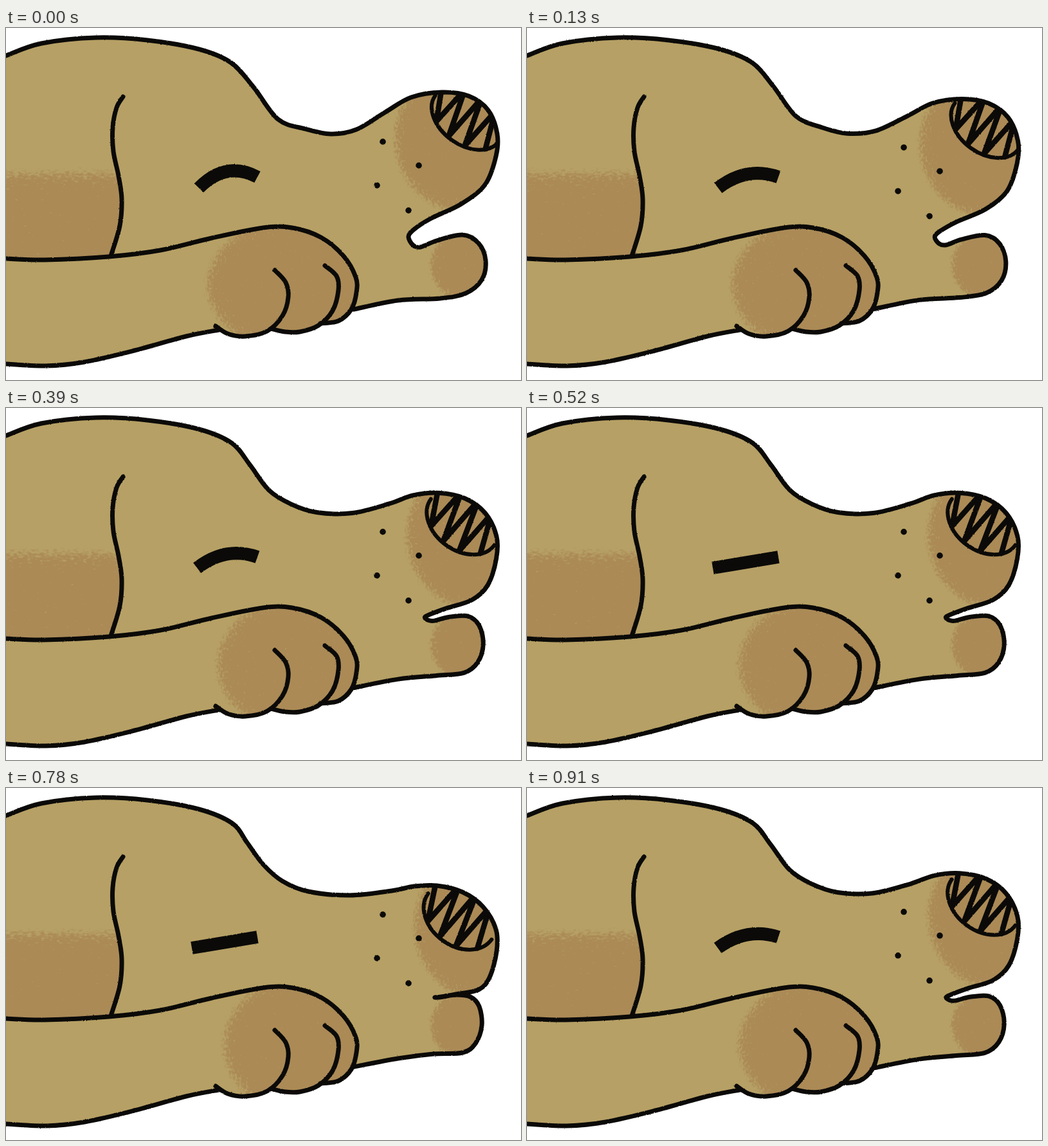
Animation, 801 px wide and 548 px high, one loop 1.04 s. Source, as an HTML page:

```html
<!DOCTYPE html>
<html lang="en">
<head>
<meta charset="utf-8">
<title>Sleeping dog</title>
<style>
html, body { margin: 0; width: 100%; height: 100%; overflow: hidden; background: #fff; }
svg { display: block; width: 801px; height: 548px; }
.coat { fill: #b6a065; }
.ink { fill: none; stroke: #0b0a08; stroke-width: 7; stroke-linecap: round; stroke-linejoin: round; }
#rim { stroke-width: 6; }
#scribble { stroke-width: 8.5; }
#eye { stroke-width: 20; stroke-linecap: butt; }
#dots { stroke-width: 9.5; }
</style>
</head>
<body>
<svg viewBox="0 0 801 548">
  <defs id="defs">
    <filter id="rough" filterUnits="userSpaceOnUse" x="-20" y="-20" width="841" height="588" color-interpolation-filters="sRGB">
      <feTurbulence id="roughGrain" type="fractalNoise" baseFrequency=".4" numOctaves="2"/>
      <feDisplacementMap in="SourceGraphic" scale="2" xChannelSelector="R" yChannelSelector="G"/>
    </filter>
    <clipPath id="headClip"><path id="headArea"/></clipPath>
    <clipPath id="earClip"><path id="earArea"/></clipPath>
    <clipPath id="armClip"><path id="armArea"/></clipPath>
  </defs>
  <path id="headFill" class="coat"/>
  <g clip-path="url(#earClip)"><rect id="earShade" x="-150" y="229" width="500" height="400"/></g>
  <g clip-path="url(#headClip)">
    <ellipse id="muzzleShade" ry="113"/>
    <ellipse id="chinShade" cx="719" cy="369" rx="58" ry="55"/>
  </g>
  <path id="armFill" class="coat"/>
  <g clip-path="url(#armClip)"><ellipse id="pawShade" cx="468" cy="400" ry="108"/></g>
  <g class="ink" filter="url(#rough)">
    <g clip-path="url(#headClip)">
      <path id="scribble"/>
      <path id="rim"/>
    </g>
    <path id="head"/>
    <path id="ear"/>
    <path id="eye"/>
    <path id="arm"/>
    <path id="toe1"/>
    <path id="toe2"/>
    <path id="under"/>
    <path id="dots"/>
  </g>
</svg>
<script>
const STEP = 130;
// One breath: how far the muzzle has sunk, and how curved the eyelid is
const drop = [0, .2, .62, .62, .62, .8, 1, .63];
const bend = [1, .75, .75, .75, 0, 0, 0, .7];

const $ = id => document.getElementById(id);
const parse = s => s.split(' ').map(p => p.split(',').map(Number));
const mix = (a, b, t) => a + (b - a) * t;

const back = parse('-10,47 0,43 55,24 140,15 220,19 300,33');
const raised = parse('350,54 385,92 423,142 465,157 505,165 545,158 590,131 630,108 678,100 720,106 750,128 764,165 762,200 745,244 708,274 660,297 634,314 626,325 633,338 645,341 670,331 710,322 735,335 746,362 740,392 715,413 675,421 610,424 541,438');
const sunk = parse('352,55 375,85 400,119 430,145 470,161 535,167 600,160 635,153 670,152 710,162 742,185 762,220 763,255 752,295 735,314 700,321 677,325 667,326 672,326 680,325 700,322 722,325 736,340 740,370 730,398 710,412 665,414 610,421 541,434');
const still = {
  arm: parse('-10,359 0,359 60,361 160,356 240,346 320,327 400,311 445,311 490,326 525,355 544,388 545,412 537,438 517,456 489,460'),
  toe1: parse('418,377 435,396 439,419 430,448 406,472 372,480 345,476 326,464'),
  toe2: parse('496,370 514,386 517,408 508,440 486,463 457,473 434,473 412,468'),
  under: parse('331,470 280,480 200,502 122,520 62,526 0,523 -10,522'),
  ear: parse('182,107 172,124 166,155 167,192 175,230 180,266 177,308 163,355')
};
const whiskers = parse('586,177 642,214 577,245 626,284');

// Chalk: blurred coverage times grain, cut to a speckled edge
function addChalk(name, freq, blur) {
  $('defs').insertAdjacentHTML('beforeend', `
    <filter id="${name}Chalk" filterUnits="userSpaceOnUse" x="-80" y="-40" width="940" height="640" color-interpolation-filters="sRGB">
      <feGaussianBlur in="SourceAlpha" stdDeviation="${blur}" result="soft"/>
      <feTurbulence id="${name}Grain" type="fractalNoise" baseFrequency="${freq}" numOctaves="3"/>
      <feColorMatrix values="0 0 0 0 0 0 0 0 0 0 0 0 0 0 0 1 0 0 0 0" result="grain"/>
      <feComposite in="soft" in2="grain" operator="arithmetic" k1="6" k2="1" k3="0" k4="-1.4" result="mask"/>
      <feFlood flood-color="#ab8a56"/>
      <feComposite in2="mask" operator="in"/>
    </filter>`);
  $(name + 'Shade').setAttribute('filter', `url(#${name}Chalk)`);
}

function spline(p) {
  const at = i => p[Math.max(0, Math.min(p.length - 1, i))];
  let d = 'M' + p[0];
  for (let i = 0; i < p.length - 1; i++) {
    const [a, b, c, e] = [at(i - 1), at(i), at(i + 1), at(i + 2)];
    const h1 = b.map((v, k) => v + (c[k] - a[k]) / 6);
    const h2 = c.map((v, k) => v - (e[k] - b[k]) / 6);
    d += `C${h1} ${h2} ${c}`;
  }
  return d;
}

function set(id, attrs) {
  for (const k in attrs) $(id).setAttribute(k, attrs[k]);
}

function drawStill() {
  const { arm, toe1, toe2, under, ear } = still;
  for (const k in still) set(k, { d: spline(still[k]) });
  const paw = [...arm, ...toe2.slice(4), ...toe1.slice(4), ...under];
  const area = spline(paw) + 'L-20,522L-20,360Z';
  set('armFill', { d: area });
  set('armArea', { d: area });
  set('earArea', { d: spline(ear) + 'L150,380L-20,380L-20,107Z' });
}

function drawHead(t) {
  const muzzle = raised.map((p, i) => p.map((v, k) => mix(v, sunk[i][k], t)));
  const line = spline([...back, ...muzzle]);
  const area = line + 'L500,450L-20,430Z';
  set('head', { d: line });
  set('headFill', { d: area });
  set('headArea', { d: area });
  const fall = 20 * Math.sqrt(t);
  set('dots', { d: whiskers.map(([x, y]) => `M${x},${y + fall}h.1`).join('') });
}

// A tilted oval with a zigzag running from rim to rim
function drawNose(t) {
  const rx = 61, ry = mix(41, 46, t);
  const place = `translate(${717 - 11 * t} ${141 + 59 * t}) rotate(36)`;
  const edge = (u, side) => [u, side * ry * .95 * Math.sqrt(1 - (u / rx) ** 2)];
  const zigzag = [];
  for (let u = -58; u < 50; u += 29) zigzag.push(edge(u, -1), edge(u + 22, 1));
  set('rim', { d: `M${-rx},0A${rx},${ry} 0 0 0 ${rx},0`, transform: place });
  set('scribble', { d: 'M' + zigzag.join('L'), transform: place });
}

function drawEye(b) {
  set('eye', { d: `M${289 + 11 * b},249Q${342},${240 - 34 * b} 391,232` });
}

function draw(i) {
  const t = drop[i];
  drawHead(t);
  drawNose(t);
  drawEye(bend[i]);
  set('muzzleShade', { cx: 713 + 24 * t, cy: 172 + 42 * t, rx: 107 - 6 * t });
  set('pawShade', { rx: 154 - 26 * t });
  set('roughGrain', { seed: Math.round(t * 50) });
  for (const k of ['ear', 'muzzle', 'chin', 'paw']) set(k + 'Grain', { seed: i * 7 + 3 });
}

addChalk('ear', '.15 .3', 20);
addChalk('muzzle', '.3 .22', 15);
addChalk('chin', '.3 .22', 10);
addChalk('paw', '.3 .22', 17);
drawStill();

const start = performance.now();
let shown = -1;
function tick() {
  const i = Math.floor((performance.now() - start) / STEP) % drop.length;
  if (i !== shown) draw(shown = i);
  requestAnimationFrame(tick);
}
tick();
</script>
</body>
</html>
```
